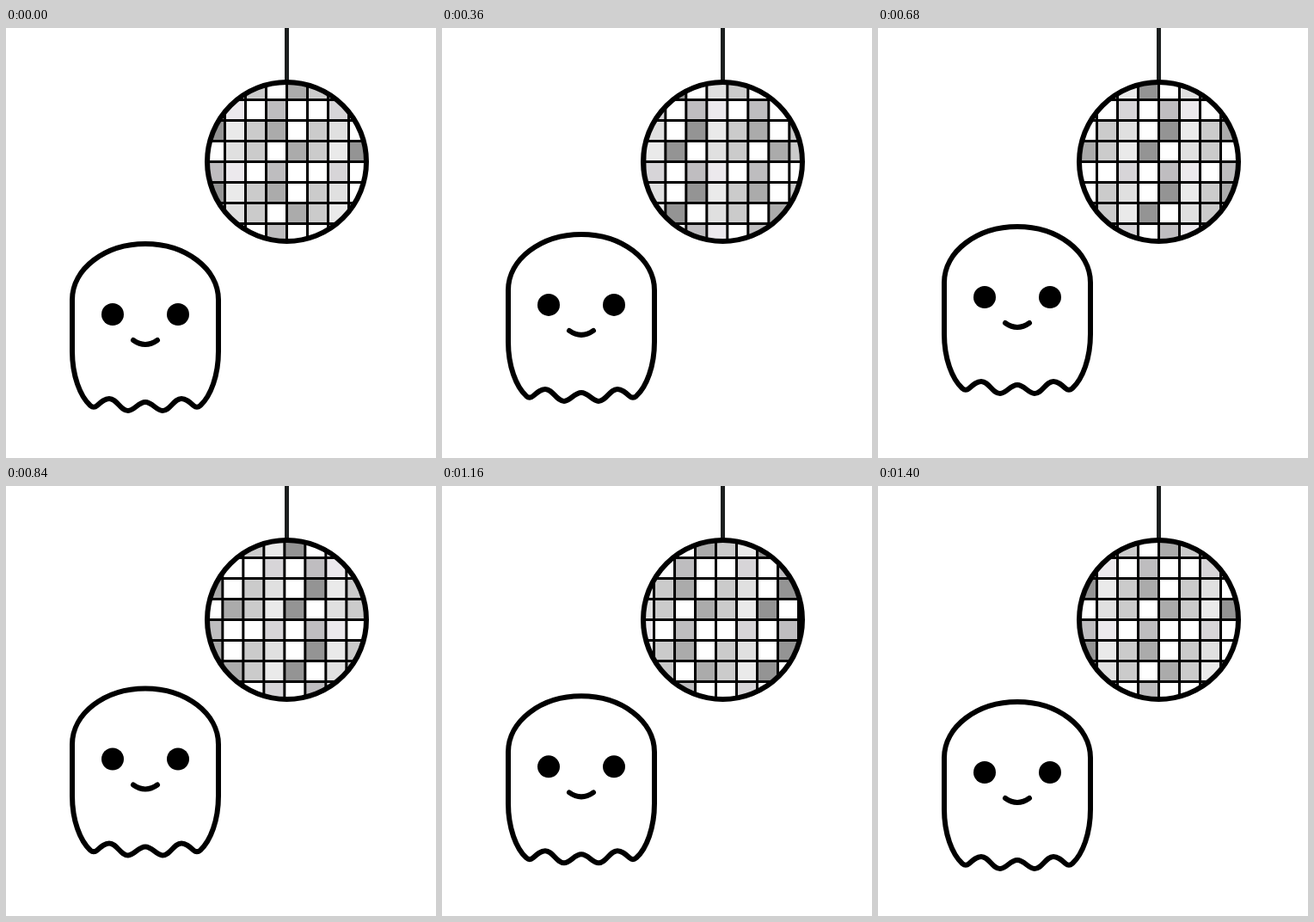
Animation of 500x500 px, one loop 1440 ms. Source, as an HTML page with a canvas:

```html
<!DOCTYPE html>
<html lang="en">
<head>
<meta charset="utf-8">
<title>Ghost and disco ball</title>
<style>
  html, body { margin: 0; width: 100%; height: 100%; overflow: hidden; background: #fff; }
  canvas { display: block; }
</style>
</head>
<body>
<canvas id="stage" width="500" height="500"></canvas>
<script>
const ctx = document.getElementById('stage').getContext('2d');

const STEP_MS = 80;
const STEPS = 18;
const FLOAT_HEIGHT = 20;
const BALL = { x: 326.5, y: 155.5, r: 92.5 };
const CELL = 24;
const COLUMNS = 8;

// Three tile rows, repeated down the ball; each letter is one shade.
const TILES = ['adeg.fd.', '..m.lp.k', '.df.gedb'];
const SHADES = {
  a: '#ababab', b: '#ababab', d: '#cbcbcb', e: '#eaeaea', f: '#e0e0e0',
  g: '#949494', k: '#bebdbf', l: '#bfbdc0', m: '#d7d5d8', p: '#ece9ed',
  '.': '#fff'
};

const BODY = new Path2D(`
  M77 316 C77 280 115 251 162 251 S247 280 247 316
  V376 C247 404 238 428 226 439 Q222 442.5 218 439
  C213 434.5 209 431 204 431 C195 431 191 445 182 445
  C175 445 170 435 162 435 S149 445 142 445
  C133 445 129 431 120 431 C115 431 111 434.5 106 439
  Q102 442.5 98 439 C86 428 77 404 77 376 Z`);
const SMILE = new Path2D('M148 363 Q162 373 176 363');

const mod = (value, size) => ((value % size) + size) % size;

function disc(x, y, r) {
  ctx.beginPath();
  ctx.arc(x, y, r, 0, Math.PI * 2);
}

function drawBall(progress) {
  const shift = progress * COLUMNS * CELL;
  const first = Math.floor((-BALL.r - shift) / CELL);

  ctx.fillStyle = '#1c1f1f';
  ctx.fillRect(324, 0, 5, 64);

  ctx.save();
  disc(BALL.x, BALL.y, BALL.r);
  ctx.clip();
  for (let col = first; col <= first + COLUMNS; col++) {
    const x = BALL.x + col * CELL + shift;
    for (let row = 0; row < 8; row++) {
      ctx.fillStyle = SHADES[TILES[row % 3][mod(col, COLUMNS)]];
      ctx.fillRect(x, BALL.y + (row - 4) * CELL, CELL + 1, CELL);
    }
  }
  ctx.fillStyle = '#000';
  for (let col = first; col <= first + COLUMNS + 1; col++) {
    ctx.fillRect(BALL.x + col * CELL + shift - 1.5, BALL.y - BALL.r, 3, BALL.r * 2);
  }
  for (let row = -3; row <= 3; row++) {
    ctx.fillRect(BALL.x - BALL.r, BALL.y + row * CELL - 1.5, BALL.r * 2, 3);
  }
  ctx.restore();

  disc(BALL.x, BALL.y, BALL.r);
  ctx.stroke();
}

function drawGhost(progress) {
  const lift = FLOAT_HEIGHT * (1 - Math.abs(1 - 2 * progress));
  ctx.save();
  ctx.translate(0, -lift);
  ctx.stroke(BODY);
  ctx.stroke(SMILE);
  ctx.fillStyle = '#000';
  for (const x of [124, 200]) {
    disc(x, 333, 13);
    ctx.fill();
  }
  ctx.restore();
}

function render() {
  const step = Math.floor(performance.now() / STEP_MS + 0.5) % STEPS;
  const progress = step / STEPS;
  ctx.fillStyle = '#fff';
  ctx.fillRect(0, 0, 500, 500);
  ctx.strokeStyle = '#000';
  ctx.lineWidth = 6;
  ctx.lineCap = ctx.lineJoin = 'round';
  drawBall(progress);
  drawGhost(progress);
  requestAnimationFrame(render);
}
render();
</script>
</body>
</html>
```
